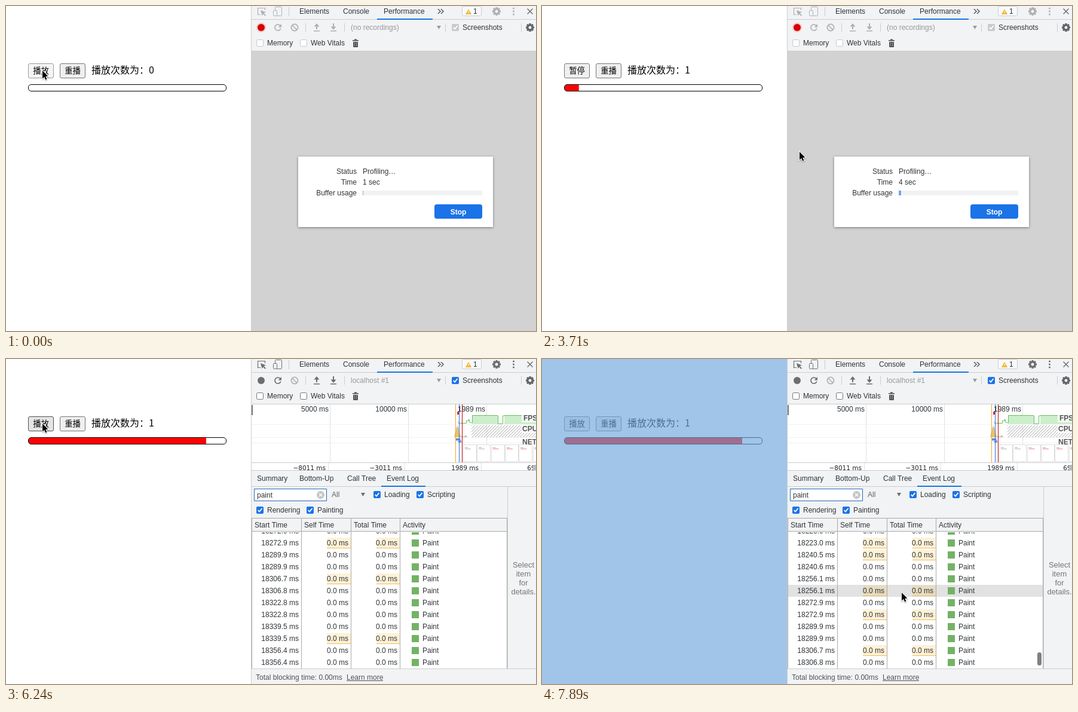
Animation of 887x544 px, one loop 8 s. Source, as an HTML page with a canvas:

```html
<!DOCTYPE html>
<html lang="zh">
<head>
<meta charset="utf-8">
<style>
html, body { margin: 0; width: 100%; height: 100%; overflow: hidden; background: #fff; }
canvas { display: block; }
</style>
</head>
<body>
<canvas id="stage" width="887" height="544"></canvas>
<script>
const ctx = document.getElementById('stage').getContext('2d');
const LOOP = 8000;
const SANS = '"Liberation Sans", Arial, sans-serif';
const CJK = '"Noto Sans CJK SC", "Noto Sans CJK", sans-serif';
const DEJAVU = '"DejaVu Sans", sans-serif';
const PANEL = '#f1f3f4', LINE = '#cacdd1', BLUE = '#1a73e8', DARK = '#303437', ICON = '#6e6e6e', PALE = '#b0b0b0';

const STOP_AT = 4740, LOADED_AT = 5340, SETTLED_AT = 5490;
const SPEED = 0.11;

// Cursor stops: time, x, y
const PATH = [
  [0, 60, 107], [2400, 60, 107], [3000, 390, 225], [3400, 430, 243], [4150, 430, 243],
  [4300, 520, 290], [4590, 755, 344], [4800, 755, 344], [5040, 640, 312], [5190, 447, 245],
  [5340, 209, 143], [5490, 100, 114], [5640, 60, 107], [6240, 60, 107], [6540, 400, 300],
  [6690, 520, 350], [6840, 545, 330], [6990, 540, 285], [7140, 540, 279], [7220, 552, 282],
  [7290, 588, 359], [7360, 601, 390], [8000, 601, 390]
];
const TIMES = ['18223.0', '18223.0', '18240.5', '18240.6', '18256.1', '18256.1', '18272.9', '18272.9', '18289.9',
  '18289.9', '18306.7', '18306.8', '18322.8', '18322.8', '18339.5', '18339.5', '18356.4', '18356.4'];
const HOT = [1, 2, 5, 7, 10, 15];

function rect(x, y, w, h, color) {
  ctx.fillStyle = color;
  ctx.fillRect(x, y, w, h);
}

function box(x, y, w, h, r, fill, stroke) {
  ctx.beginPath();
  ctx.roundRect(x, y, w, h, r);
  if (fill) { ctx.fillStyle = fill; ctx.fill(); }
  if (stroke) { ctx.strokeStyle = stroke; ctx.lineWidth = 1; ctx.stroke(); }
}

function text(s, x, y, color = DARK, align = 'left', font = '12px ' + SANS) {
  ctx.font = font;
  ctx.textAlign = align;
  ctx.fillStyle = color;
  ctx.fillText(s, x, y);
}

function trace(points, closed) {
  ctx.beginPath();
  points.forEach(([x, y], i) => i ? ctx.lineTo(x, y) : ctx.moveTo(x, y));
  if (closed) ctx.closePath();
}

function line(points, color, width = 1) {
  trace(points);
  ctx.strokeStyle = color;
  ctx.lineWidth = width;
  ctx.stroke();
}

function poly(points, color) {
  trace(points, true);
  ctx.fillStyle = color;
  ctx.fill();
}

function disc(x, y, r, color) {
  ctx.beginPath();
  ctx.arc(x, y, r, 0, 7);
  ctx.fillStyle = color;
  ctx.fill();
}

function clipped(x, y, w, h, draw) {
  ctx.save();
  ctx.beginPath();
  ctx.rect(x, y, w, h);
  ctx.clip();
  draw();
  ctx.restore();
}

function cursorAt(t) {
  const i = Math.max(1, PATH.findIndex(p => p[0] >= t));
  const [t0, x0, y0] = PATH[i - 1], [t1, x1, y1] = PATH[i];
  const k = (t - t0) / (t1 - t0);
  return { x: x0 + (x1 - x0) * k, y: y0 + (y1 - y0) * k };
}

// The picture is held for about 150 ms at a time
function hold(t) {
  return t < 4431 ? Math.floor((t + 9) / 148) * 148.3 : 4440 + Math.max(0, Math.floor((t - 4440) / 150)) * 150;
}

function barWidth(t) {
  if (t < 130) return 0;
  if (t < 2092) return Math.min(176, (t - 130) * SPEED);
  if (t < 3492) return 176 + (t - 2092) * SPEED;
  return Math.min(297, (t - 3492) * SPEED);
}

function button(label, x, over, pressed) {
  const [fill, edge] = pressed ? ['#f5f5f5', '#9a9a9a'] : over ? ['#e5e5e5', '#4f4f4f'] : ['#efefef', '#767676'];
  box(x + .5, 96.5, 42, 24, 2.5, fill, edge);
  text(label, x + 21.5, 113, '#000', 'center', '13.333px ' + CJK);
}

function page(t, cur, overlay) {
  rect(0, 0, 410, 544, '#fff');
  const paused = t < 130 || (t > 1730 && t < 2092) || t > 6192;
  const pressed = t < 130 || (t > 2000 && t < 2092);
  const over = x => cur.x >= x && cur.x < x + 43 && cur.y >= 96 && cur.y < 121;
  button(paused ? '播放' : '暂停', 37, over(37), pressed);
  button('重播', 90, over(90), false);
  text('播放次数为：' + (t < 3492 ? 0 : 1), 143, 113, '#000', 'left', '16px ' + CJK);
  ctx.save();
  ctx.beginPath();
  ctx.roundRect(37.5, 131.5, 331, 11, 4.5);
  ctx.clip();
  rect(38, 132, barWidth(t), 10, '#f00');
  ctx.restore();
  box(37.5, 131.5, 331, 11, 4.5, null, '#000');
  if (overlay) rect(0, 0, 410, 544, 'rgba(111,168,220,.66)');
}

function gear(x, y, color) {
  ctx.save();
  ctx.translate(x, y);
  for (let i = 0; i < 8; i++) {
    rect(-1.7, -7, 3.4, 4, color);
    ctx.rotate(Math.PI / 4);
  }
  ctx.restore();
  ctx.beginPath();
  ctx.arc(x, y, 3.9, 0, 7);
  ctx.strokeStyle = color;
  ctx.lineWidth = 3;
  ctx.stroke();
  disc(x, y, 2.3, PANEL);
}

function arrow(x, dir, color) {
  rect(x - 1, 32, 2, 7, color);
  poly(dir < 0 ? [[x, 29], [x - 4.5, 34.5], [x + 4.5, 34.5]] : [[x, 40], [x - 4.5, 34.5], [x + 4.5, 34.5]], color);
  if (dir > 0) rect(x - 1, 29, 2, 5, color);
  rect(x - 5, 41, 10, 1.5, color);
}

function check(x, y, on, off) {
  if (on) {
    box(x, y - 6, 12, 12, 2, off ? '#c8cacc' : BLUE);
    line([[x + 2.6, y], [x + 5, y + 2.6], [x + 9.5, y - 3]], '#fff', 1.8);
  } else {
    box(x + .5, y - 5.5, 11, 11, 2, '#fff', off ? '#c6c8ca' : '#767676');
  }
}

function toolbar(busy, loaded) {
  const top = busy ? PALE : ICON, tool = loaded ? ICON : PALE;
  rect(410, 0, 477, 76, PANEL);
  rect(411, 22, 476, 1, LINE);
  rect(411, 75, 476, 1, LINE);

  line([[433.5, 7], [433.5, 3.5], [421.5, 3.5], [421.5, 14.5], [426, 14.5]], top, 1.2);
  poly([[426, 7], [435, 10.5], [431.5, 12], [435, 15.5], [433.6, 16.8], [430.2, 13.3], [428.7, 16.5]], top);
  box(450.5, 1.5, 11, 15, 1, null, top);
  box(447.5, 7.5, 6, 9, 1, PANEL, top);
  rect(473, 2, 1, 15, LINE);
  text('Elements', 491, 13);
  text('Console', 564, 13);
  text('Performance', 632, 13);
  rect(621, 21, 93, 2, BLUE);
  for (const x of [723, 728]) line([[x, 5], [x + 4, 9], [x, 13]], '#5f6368', 1.6);
  box(763.5, .5, 32, 16, 2, '#f8f9fa', LINE);
  poly([[774, 5], [779, 14], [769, 14]], '#f2b52c');
  rect(773.5, 8, 1.2, 3, '#fff');
  rect(773.5, 12, 1.2, 1, '#fff');
  text('1', 782, 13);
  gear(821, 9, top);
  for (const y of [4, 9, 14]) disc(849.5, y, 1.5, top);
  line([[872.5, 4.5], [881.5, 13.5]], ICON, 1.5);
  line([[881.5, 4.5], [872.5, 13.5]], ICON, 1.5);

  if (busy) disc(427, 36, 8, '#f5c9c9');
  disc(427, 36, 6, busy ? '#d80000' : tool);
  ctx.strokeStyle = tool;
  ctx.lineWidth = 1.7;
  ctx.beginPath();
  ctx.arc(455, 36, 5, .3, 5.5);
  ctx.stroke();
  poly([[461, 30], [461, 35.5], [455.5, 35.5]], tool);
  ctx.strokeStyle = PALE;
  ctx.beginPath();
  ctx.arc(483, 36, 5.6, 0, 7);
  ctx.stroke();
  line([[479, 32], [487, 40]], PALE, 1.6);
  arrow(520, -1, tool);
  arrow(548, 1, tool);
  for (const x of [501, 566, 735, 862]) rect(x, 29, 1, 14, LINE);
  text(loaded ? 'localhost #1' : '(no recordings)', 577, 40, '#989a9c');
  poly([[721, 33], [728, 33], [724.5, 39]], '#9a9c9e');
  check(746, 36, true, busy);
  text('Screenshots', 764, 40);
  gear(877, 36, '#5f6368');
  check(419, 62, false, busy);
  text('Memory', 437, 66);
  check(492, 62, false, busy);
  text('Web Vitals', 510, 66);
  rect(580, 57, 10, 1.6, '#555');
  rect(583, 55.5, 4, 2, '#555');
  box(581, 60, 8, 9, 1, '#555');
  rect(583, 61, 1, 6, '#999');
  rect(586, 61, 1, 6, '#999');
}

function dialog(t) {
  const done = t >= STOP_AT;
  const y = done ? 261 : 252, h = done ? 100 : 118;
  rect(411, 76, 476, 468, '#d2d2d2');
  ctx.save();
  ctx.shadowColor = 'rgba(0,0,0,.45)';
  ctx.shadowBlur = 4;
  ctx.shadowOffsetY = 1;
  rect(489, y, 326, h, '#fff');
  ctx.restore();
  const row = (label, value, i) => {
    text(label, 587, y + 29 + i * 18, DARK, 'right');
    text(value, 597, y + 29 + i * 18);
  };
  row('Status', done ? 'Processing profile…' : 'Profiling…', 0);
  if (done) {
    row('Received', '', 1);
  } else {
    row('Time', 1 + (t > 1000) + (t > 2050) + (t > 3100) + (t > 4140) + ' sec', 1);
    row('Buffer usage', '', 2);
  }
  rect(597, y + h - 61, 200, 8, '#f1f2f3');
  if (!done) {
    const w = 1 + (t > 1460) + (t > 2600) + (t > 3500) + (t > 4140);
    rect(597, y + h - 61, w, 8, w === 1 ? '#a3a8ad' : '#6fa5f2');
  }
  box(717, y + h - 38, 80, 24, 4, done ? '#aecbfa' : BLUE);
  text('Stop', 757, y + h - 21, '#fff', 'center', 'bold 12px ' + SANS);
}

function overview(settled) {
  rect(411, 76, 476, 111, '#fff');
  const step = settled ? 131 : 96.3, first = settled ? 542 : 507;
  const names = settled ? ['5000', '10000', '1989'] : ['20', '40', '60', '80', '100'];
  names.forEach((_, i) => rect(Math.round(first + i * step), 76, 1, 97, '#e0e0e0'));
  for (const y of [109, 131, 140]) rect(411, y, 476, 1, '#f1f1f1');
  rect(411, 77, 2, 17, '#777');

  // FPS
  for (const [x, w] of [[780, 43], [834, 53]]) {
    rect(x, 95, w, 14, '#cdeecb');
    rect(x, 94, w, 1, '#5fc25b');
  }
  const green = '#5fc25b';
  line([[756.5, 105], [757.5, 107.5], [770.5, 107.5], [770.5, 103.5], [774.5, 103.5], [774.5, 100.5], [776.5, 106.5], [780.5, 106.5], [780.5, 95]], green);
  line([[823.5, 95], [823.5, 108.5], [831.5, 108.5], [831.5, 95], [834.5, 95]], green);
  rect(755, 88, 3, 5, '#e03030');

  // CPU
  clipped(779, 111, 108, 20, () => {
    for (let x = 760; x < 890; x += 5) line([[x, 131], [x + 20, 111]], '#a9a9a9');
  });
  poly([[750, 131], [752, 120], [755, 112], [757, 114], [759, 124], [762, 130], [768, 129], [770, 127], [772, 131]], '#c9c5bd');
  poly([[751, 131], [753, 121], [756, 114], [758, 122], [761, 131]], '#f2c25c');

  // NET
  rect(752, 133, 8, 2, '#4d7fc9');
  rect(753, 135, 9, 2, '#8db2e6');
  rect(757, 137, 5, 3, '#6b9be0');

  if (settled) {
    for (let i = 0; i < 6; i++) {
      const x = 765 + i * 23.3;
      box(Math.round(x) + .5, 143.5, 22, 28, 0, '#fff', '#ddd');
      rect(x + 3, 148, 5, 1, '#aaa');
      rect(x + 3, 150, 10, 1, i < 2 ? '#bbb' : '#e88');
    }
    rect(752, 76, 1, 97, '#f5a623');
    rect(755, 88, 3, 5, '#e03030');
    rect(758, 76, 1, 97, '#2a6fe0');
    rect(763, 76, 1, 97, '#c00');
  }
  names.forEach((n, i) => text(n + ' ms', Math.round(first + i * step) - 2, 88, DARK, 'right'));
  rect(863, 93, 24, 13, 'rgba(255,255,255,.75)');
  [['FPS', 103], ['CPU', 121], ['NET', 143]].forEach(([s, y]) => {
    if (y > 110) rect(863, y - 10, 24, 13, 'rgba(255,255,255,.75)');
    text(s, y > 110 ? 864 : 866, y, '#555', 'left', 'bold 12px ' + SANS);
  });

  // Ruler
  rect(411, 173, 476, 1, '#ccc');
  clipped(411, 174, 476, 12, () => {
    ['−8011', '−3011', '1989', '6989'].forEach((n, i) => {
      const x = 539 + i * 128;
      rect(x, 174, 1, 12, '#e0e0e0');
      text(n + ' ms', i === 3 ? 918 : x - 4, 186, '#222', 'right', '10.5px ' + DEJAVU);
    });
    box(882, 177, 10, 12, 4, '#bbb');
  });
  rect(411, 186, 476, 1, LINE);
}

function table(scroll, hover) {
  rect(411, 289, 428, 229, '#fff');
  clipped(411, 290, 428, 228, () => {
    TIMES.forEach((time, i) => {
      const y = 168 + i * 20 + scroll;
      if (i === hover.row) rect(411, y - 10, 428, 20, '#e2e2e2');
      if (HOT.includes(i)) {
        for (const [x, w] of [[537, 40], [620, 39]]) {
          rect(x, y - 9, w, 17, 'rgba(245,190,75,.22)');
          rect(x, y + 8, w, 1, '#f2bd4e');
        }
      }
      text(time + ' ms', 490, y + 4, DARK, 'right');
      text('0.0 ms', 573, y + 4, DARK, 'right');
      text('0.0 ms', 655, y + 4, DARK, 'right');
      rect(679, y - 6, 12, 12, '#74b266');
      text('Paint', 697, y + 4);
    });
  });
  rect(411, 266, 428, 1, '#aaa');
  rect(411, 267, 428, 22, PANEL);
  if (hover.header) rect(495, 267, 82, 22, '#e2e3e4');
  rect(411, 288, 428, 1, '#aaa');
  [['Start Time', 416], ['Self Time', 499], ['Total Time', 582], ['Activity', 664]].forEach(([s, x]) => text(s, x, 282));
  for (const x of [494, 577, 659]) rect(x, 267, 1, 251, '#aaa');
  rect(411, 267, 1, 251, '#aaa');
  rect(838, 267, 1, 251, '#aaa');
}

function results(t, scroll, hover) {
  const settled = t >= SETTLED_AT;
  overview(settled);
  rect(411, 187, 476, 357, PANEL);
  rect(411, 213, 476, 1, LINE);
  [['Summary', 420], ['Bottom-Up', 491], ['Call Tree', 571], ['Event Log', 637]].forEach(([s, x]) => text(s, x, 204));
  rect(628, 212, 74, 2, BLUE);
  box(415.5, 217.5, 121, 20, 0, '#fff', '#2b66b8');
  text('paint', 420, 232);
  text('All', 545, 231, '#5f6368');
  if (settled) {
    disc(526.5, 227.5, 6.5, '#c4c6c8');
    line([[524, 225], [529, 230]], '#fff', 1.3);
    line([[529, 225], [524, 230]], '#fff', 1.3);
    poly([[594, 224], [601, 224], [597.5, 230]], ICON);
  }
  [['Loading', 615, 227], ['Scripting', 687, 227], ['Rendering', 419, 253], ['Painting', 503, 253]].forEach(([s, x, y]) => {
    check(x, y, true);
    text(s, x + 18, y + 4);
  });
  table(scroll, hover);
  if (scroll) box(829, 491, 7, 22, 3.5, '#7f7f7f');
  rect(839, 214, 1, 304, LINE);
  ['Select', 'item', 'for', 'details.'].forEach((s, i) => text(s, 866, 349 + i * 15, '#757575', 'center', '13px ' + SANS));
  rect(411, 518, 476, 1, LINE);
  text('Total blocking time: 0.00ms', 418, 537, '#505357');
  text('Learn more', 570, 537, '#505357');
  rect(570, 538, 61, 1, '#505357');
}

function pointer({ x, y }) {
  ctx.save();
  ctx.translate(x, y);
  trace([[1, 1], [1, 14.5], [4.1, 11.7], [6.2, 16.5], [8.4, 15.5], [6.3, 10.9], [10.3, 10.6]], true);
  ctx.shadowColor = 'rgba(0,0,0,.35)';
  ctx.shadowBlur = 2;
  ctx.shadowOffsetY = 1;
  ctx.lineWidth = 2;
  ctx.strokeStyle = '#fff';
  ctx.stroke();
  ctx.shadowColor = 'transparent';
  ctx.fillStyle = '#000';
  ctx.fill();
  ctx.restore();
}

function draw(t) {
  const cur = cursorAt(t), loaded = t >= LOADED_AT;
  const scroll = t >= 7890 ? 120 : t >= 7740 ? 60 : 0;
  // Hover trails slightly behind the pointer
  const seen = cursorAt(Math.max(0, t - 75));
  const inTable = loaded && seen.x > 412 && seen.x < 838;
  const hover = {
    row: inTable && seen.y > 290 && seen.y < 518 ? Math.floor((seen.y - 158 - scroll) / 20) : -1,
    header: inTable && seen.y > 267 && seen.y < 289 && seen.x > 495 && seen.x < 577
  };
  // Row positions start six rows up while unscrolled
  page(t, cur, hover.row >= 0);
  toolbar(t < STOP_AT, loaded);
  if (loaded) results(t, scroll, hover);
  else dialog(t);
  rect(410, 0, 1, 544, LINE);
  pointer(cur);
}

function tick(now) {
  draw(hold(now % LOOP));
  requestAnimationFrame(tick);
}
requestAnimationFrame(tick);
</script>
</body>
</html>
```
